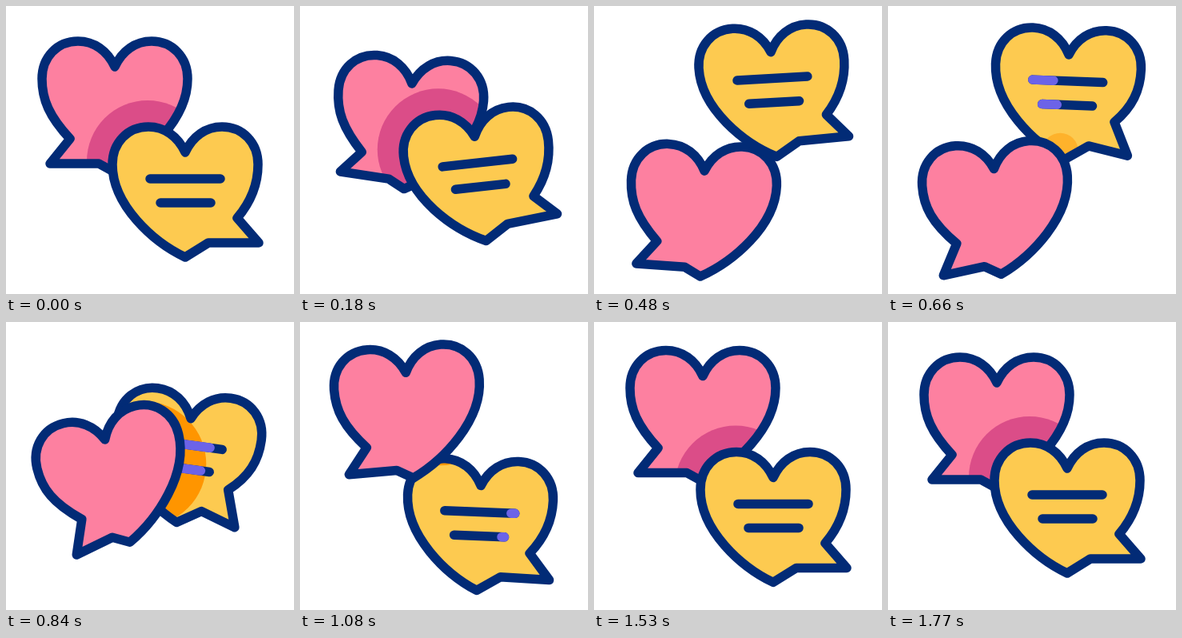
These frames come from a looping animation (360 px wide and 360 px high, 1800 ms). An HTML page:

```html
<!DOCTYPE html>
<html lang="en">
<head>
<meta charset="utf-8">
<title>Heart chat</title>
<style>
  html, body { margin: 0; width: 100%; height: 100%; overflow: hidden; background: #fff; }
  svg { display: block; width: 100%; height: 100%; }
  .outline { fill: none; stroke: #022b76; stroke-width: 11.5; stroke-linejoin: round; }
  .text { stroke: #022b76; stroke-width: 11.5; stroke-linecap: round; }
  .glint { stroke: #6c63e8; stroke-width: 11.5; stroke-linecap: round; }
</style>
</head>
<body>
<svg viewBox="0 0 360 360"></svg>
<script>
const LOOP = 1800;
const PIVOT = 52; // rotation centre, below the notch of the heart
const SWAP_UP = 565, SWAP_DOWN = 1150;
const svg = document.querySelector("svg");

function add(parent, tag, attrs = {}) {
  const el = document.createElementNS("http://www.w3.org/2000/svg", tag);
  set(el, attrs);
  return parent.appendChild(el);
}

function set(el, attrs) {
  for (const key in attrs) el.setAttribute(key, attrs[key]);
}

const mix = (a, b, p) => a + (b - a) * p;
const ramp = (t, from, to) => Math.min(1, Math.max(0, (t - from) / (to - from)));
const ease = (t, from, to) => (1 - Math.cos(Math.PI * ramp(t, from, to))) / 2;
const bump = (t, from, to) => Math.sin(Math.PI * ramp(t, from, to)) ** 2;

// The hearts pass each other, swing back a little too far, then settle.
const phases = t => ({
  go: ease(t, 50, 570),
  back: ease(t, 545, 1200),
  settle: ease(t, 1200, 1740),
  leanOut: bump(t, 50, 570),
  leanBack: bump(t, 545, 1200),
  tailBack: bump(t, 440, 1150)
});

// side: 1 puts the speech tail on the right, -1 on the left.
function heartPath(side, corner, tail, inner, tip) {
  const s = x => x * side;
  return `M0 0C${s(9)} -20 ${s(26)} -32 ${s(46)} -32C${s(72)} -32 ${s(91)} -12 ${s(91)} 15`
    + `C${s(91)} 41 ${s(82)} 62 ${s(corner[0])} ${corner[1]}L${s(tail[0])} ${tail[1]}`
    + `L${s(inner[0])} ${inner[1]}L0 ${tip}`
    + `C${s(-40)} 112 ${s(-91)} 66 ${s(-91)} 15C${s(-91)} -12 ${s(-72)} -32 ${s(-46)} -32`
    + `C${s(-26)} -32 ${s(-9)} -20 0 0Z`;
}

function makeHeart(spec) {
  const group = add(svg, "g");
  const clip = add(group, "clipPath", { id: spec.id });
  const clipShape = add(clip, "path");
  const fill = add(group, "path", { fill: spec.fill });
  const shadeBox = add(group, "g", { "clip-path": `url(#${spec.id})` });
  const shade = add(shadeBox, "circle", { fill: spec.shade });
  const outline = add(group, "path", { class: "outline" });
  return { ...spec, group, shade, shapes: [clipShape, fill, outline] };
}

const pink = makeHeart({
  id: "pinkClip", fill: "#fd80a0", shade: "#db4d88",
  side: -1, x: 136, y: 128, travel: 140, comeback: 166, lean: [8.5, 14],
  corner: [56, 90], tail: [81, 121], inner: [20, 121], tip: 132,
  tailLift: 9, tailDrop: [13, 11],
  cast: { x: 40, y: 41, r: 78 }
});

const yellow = makeHeart({
  id: "yellowClip", fill: "#fdca50", shade: "#ff9500",
  side: 1, x: 224, y: 235, travel: 135, comeback: 170, lean: [12.5, 8],
  corner: [65, 82], tail: [92, 113], inner: [29, 113], tip: 131,
  tailLift: 11, tailDrop: [20, 15],
  cast: { x: -47, y: 11, r: 76 }
});

const textGroup = add(yellow.group, "g");
const lines = [[-44, 44, 33], [-31, 32, 63]].map(([x1, x2, y]) => {
  add(textGroup, "line", { class: "text", x1, x2, y1: y, y2: y });
  const glint = add(textGroup, "line", { class: "glint", y1: y, y2: y });
  return { x1, x2, glint };
});

function poseHeart(heart, p) {
  const { side, travel, comeback, lean, corner, tail, tailLift, tailDrop } = heart;
  const shift = comeback * p.back - travel * p.go - (comeback - travel) * p.settle;
  const y = heart.y + side * shift;
  const angle = side * (lean[1] * p.leanBack - lean[0] * p.leanOut);
  const pull = tailDrop[0] * p.tailBack;
  const d = heartPath(
    side,
    [corner[0] - pull * 0.35, corner[1]],
    [tail[0] - pull, tail[1] + tailDrop[1] * p.tailBack - tailLift * p.leanOut],
    heart.inner, heart.tip
  );
  const transform = `translate(${heart.x} ${y}) rotate(${angle}) translate(0 ${-PIVOT})`;
  heart.shapes.forEach(shape => set(shape, { d, transform }));
  return { y, angle, transform };
}

// The shade grows from beside the casting heart's shoulder.
function castShade(from, pose, onto, grow) {
  const a = pose.angle * Math.PI / 180;
  const { x, y, r } = from.cast;
  const dx = mix(-102 * from.side, x, grow);
  const dy = mix(-40, y, grow) - PIVOT;
  set(onto.shade, {
    cx: from.x + dx * Math.cos(a) - dy * Math.sin(a),
    cy: pose.y + dx * Math.sin(a) + dy * Math.cos(a),
    r: r * grow,
    opacity: Math.min(1, grow * 1.6)
  });
}

function render(t) {
  const p = phases(t);
  const pinkPose = poseHeart(pink, p);
  const yellowPose = poseHeart(yellow, p);
  set(textGroup, { transform: yellowPose.transform });

  const pinkOnTop = t >= SWAP_UP && t < SWAP_DOWN;
  const top = pinkOnTop ? pink.group : yellow.group;
  if (svg.lastChild !== top) svg.appendChild(top);

  castShade(yellow, yellowPose, pink, pinkOnTop ? 0 : t < SWAP_UP ? 1 : ramp(t, SWAP_DOWN, 1310));
  castShade(pink, pinkPose, yellow, pinkOnTop ? ramp(t, 615, 775) : 0);

  const head = ramp(t, 560, 900), rear = ramp(t, 760, 1100);
  for (const { x1, x2, glint } of lines) {
    set(glint, {
      x1: mix(x1, x2, rear), x2: mix(x1, x2, head) + 0.01,
      visibility: head > 0 && rear < 1 ? "visible" : "hidden"
    });
  }
}

const start = performance.now();
function tick() {
  render((performance.now() - start) % LOOP);
  requestAnimationFrame(tick);
}
tick();
</script>
</body>
</html>
```
